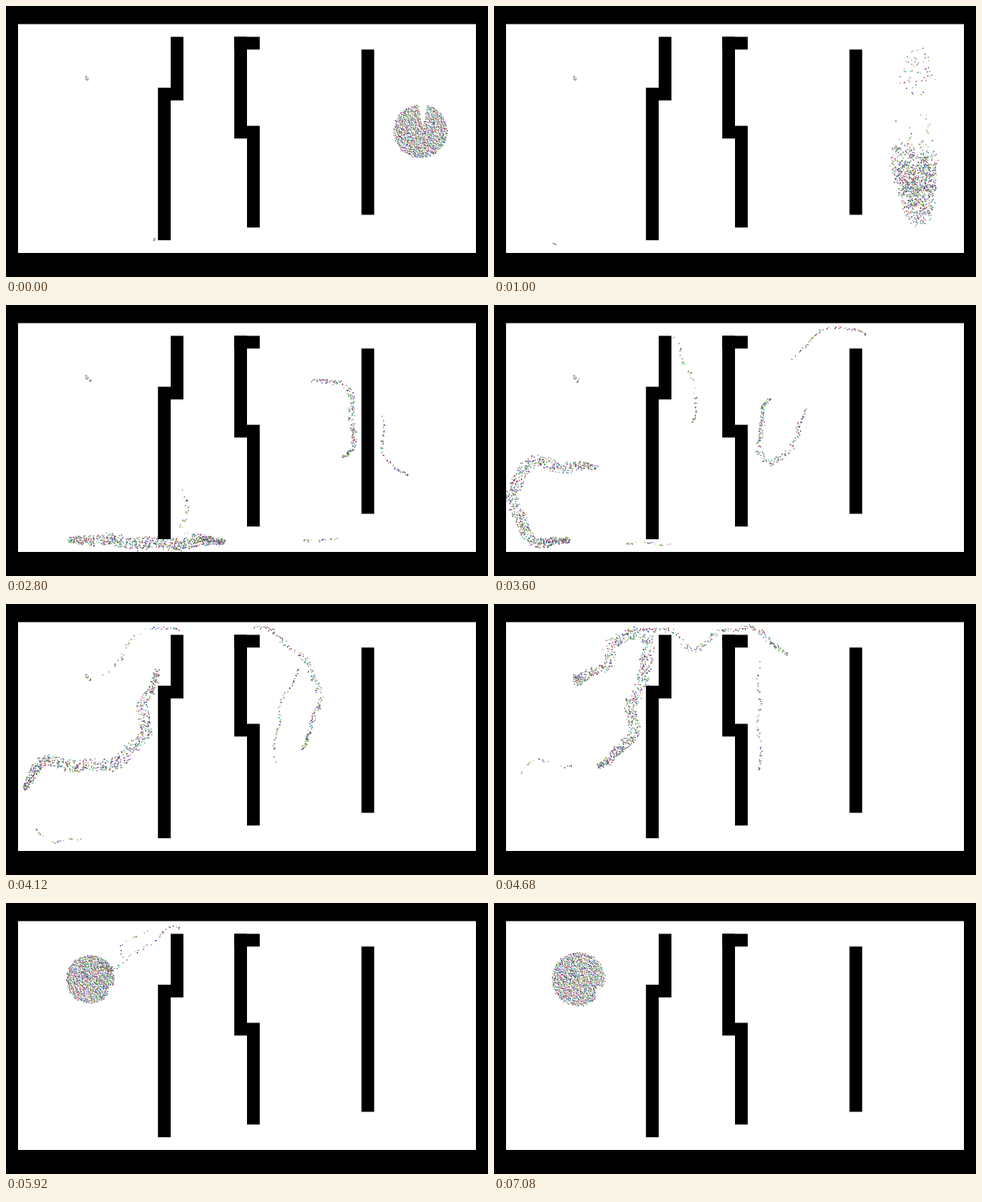
An HTML page with a canvas that plays this animation: 600x338 px, repeating every 7.12 s.

```html
<!DOCTYPE html>
<html lang="en">
<head>
<meta charset="utf-8">
<title>Crowd flow</title>
<style>
  html, body { margin: 0; width: 100%; height: 100%; overflow: hidden; background: #000; }
  canvas { display: block; }
</style>
</head>
<body>
<canvas id="stage" width="600" height="338"></canvas>
<script>
const ctx = document.getElementById('stage').getContext('2d');
const LOOP = 7120, STEP = 40, RADIUS = 33;
const SPEED = 0.25, SPEED_UP = 1780;   // px per ms, ms until cruising
const START = [516, 156], GOAL = [105, 95];
const FIELD = { x: 15, y: 22.6, cellW: 570 / 36, cellH: 285.4 / 18 };

let seed = 20;
function random() {
  seed = (seed * 1664525 + 1013904223) % 4294967296;
  return seed / 4294967296;
}
const clamp = v => Math.max(0, Math.min(1, v));
const mix = (a, b, f) => a + (b - a) * f;

// Smooth route through a few points, read by distance travelled.
function makeRoute(points) {
  const at = n => points[Math.max(0, Math.min(points.length - 1, n))];
  const samples = [];
  let length = 0;
  for (let k = 0; k <= (points.length - 1) * 20; k++) {
    const i = Math.floor(k / 20), f = k / 20 - i;
    const [a, b, c, d] = [at(i - 1), at(i), at(i + 1), at(i + 2)];
    const [x, y] = [0, 1].map(n => b[n] + 0.5 * f * (c[n] - a[n] +
      f * (2 * a[n] - 5 * b[n] + 4 * c[n] - d[n] + f * (3 * (b[n] - c[n]) + d[n] - a[n]))));
    const before = samples[samples.length - 1];
    if (before) length += Math.hypot(x - before.x, y - before.y);
    samples.push({ x, y, s: length });
  }
  const place = s => {
    s = Math.max(0, Math.min(length, s));
    let low = 0, high = samples.length - 1;
    while (high - low > 1) {
      const mid = (low + high) >> 1;
      if (samples[mid].s <= s) low = mid; else high = mid;
    }
    const a = samples[low], b = samples[high], gap = b.s - a.s || 1;
    const f = (s - a.s) / gap;
    return { x: mix(a.x, b.x, f), y: mix(a.y, b.y, f), nx: (a.y - b.y) / gap, ny: (b.x - a.x) / gap };
  };
  return { length, place };
}

const exit = [START, [528, 250], [508, 291], [440, 293]];
const finish = [[190, 50], [176, 34], [147, 52], [143, 72], GOAL];
const corner = [[102, 292], [60, 297], [35, 275], [24, 235]];

const west = makeRoute([...exit, [290, 292], [195, 298], ...corner, [45, 198], [96, 202],
  [135, 198], [171, 165], [172, 125], [188, 85], ...finish]);
const middle = makeRoute([...exit, [367, 227], [400, 196], [430, 180], [421, 99], [350, 110],
  [330, 168], [348, 198], [378, 160], [387, 97], [335, 38], [290, 31], [250, 55], [215, 32], ...finish.slice(1)]);
const upward = makeRoute([...exit, [290, 292], [225, 285], [224, 258], [218, 172], [253, 132],
  [235, 65], [213, 31], ...finish.slice(1)]);
const top3 = makeRoute([START, [528, 55], [487, 62], [475, 95], [480, 220], [555, 215], [475, 195],
  [465, 45], [400, 38], [345, 121], [333, 207], [330, 150], [325, 40], [280, 33], [245, 53],
  [213, 31], [183, 47], [153, 70], GOAL]);
const left = makeRoute([[189, 289], ...corner, [55, 169], GOAL]);

const groups = [
  { route: west, count: 760, delay: 0, length: 88, width: 0.26, loose: 1 },
  { route: middle, count: 200, delay: 100, length: 66, width: 0.12, loose: 1 },
  { route: upward, count: 50, delay: 150, length: 43, width: 0.07, loose: 1 },
  { route: top3, count: 55, delay: -60, length: 40, width: 0.05, loose: 1 },
  { route: west, count: 18, delay: 870, length: 25, width: 0.05, loose: 1 },
  { route: left, count: 3, delay: -280, length: 8, width: 0.04, loose: 0.15 }
];

// Steady acceleration, then constant speed.
function travelled(t) {
  if (t <= 0) return 0;
  return t < SPEED_UP ? SPEED * t * t / (2 * SPEED_UP) : SPEED * (t - SPEED_UP / 2);
}

// The queue stretches out as it travels.
function progress({ group, u }, t) {
  const s = travelled(t - group.delay);
  return s + (u - 0.5) * group.length * (1 + s / 400) * clamp(s / 100);
}

function arrival(dot) {
  let t = 0;
  while (t < LOOP && progress(dot, t) < dot.group.route.length) t += 10;
  return t;
}

// Evenly packed disc, leaving out the places where blocked() holds.
function packDisc(count, blocked) {
  const spots = [];
  for (let k = 0; spots.length < count; k++) {
    const r = RADIUS * Math.sqrt((k + 0.5) / (count * 1.03));
    const x = r * Math.cos(k * 2.39996) + random() - 0.5;
    const y = r * Math.sin(k * 2.39996) + random() - 0.5;
    if (!blocked(x, y)) spots.push([x, y]);
  }
  return spots;
}

const dots = groups.flatMap(group => Array.from({ length: group.count }, () => {
  const [r, g, b] = [0, 0, 0].map(() => Math.floor(20 + random() * 190));
  const dot = { group, u: random() ** 1.25, order: random(), phase: random() * 6.28, color: `rgb(${r},${g},${b})` };
  dot.arrival = arrival(dot);
  return dot;
}));

// Mixed places at the start; at the goal the disc fills from the centre.
function assign(name, sortBy, spots) {
  [...dots].sort((a, b) => a[sortBy] - b[sortBy]).forEach((dot, i) => { dot[name] = spots[i]; });
}
assign('start', 'order', packDisc(dots.length, (x, y) => y < -8 && Math.abs(x - 3) < 1 - (y + 8) * 0.2));
assign('goal', 'arrival', packDisc(dots.length, (x, y) => x > 22 && y > 9 && y < 24));

function position(dot, t) {
  const { route, width, loose } = dot.group;
  const s = progress(dot, t);
  const { x, y, nx, ny } = route.place(s);
  const gathered = Math.exp(-((Math.max(0, s) / 110) ** 2));
  const settled = clamp((s - route.length) / 25 + 1);
  const lens = 0.3 + 0.7 * Math.sqrt(4 * dot.u * (1 - dot.u));
  const spread = mix(width * lens, loose, gathered);
  const wave = 2 * Math.sin(s / 9) * (1 - gathered) * (1 - settled);
  const sway = 0.6 * Math.sin(t / 280 + dot.phase);
  return [
    x + nx * wave + mix(dot.start[0] * spread, dot.goal[0], settled) + sway,
    y + ny * wave + mix(dot.start[1] * spread, dot.goal[1], settled) - sway
  ];
}

// Column, row, columns wide, rows high.
const walls = [[12, 1, 1, 5], [11, 5, 1, 12], [17, 1, 1, 8], [17, 1, 2, 1], [18, 8, 1, 8], [27, 2, 1, 13]];

function drawWalls() {
  const { x, y, cellW, cellH } = FIELD;
  ctx.fillStyle = '#000';
  for (const [col, row, w, h] of walls)
    ctx.fillRect(x + col * cellW, y + row * cellH, w * cellW, h * cellH);
}

const pointer = new Path2D('M99.3 87v5.2l1.2-1 .9 1.8.8-.4-.7-1.6 1.5-.2z');
function drawPointer() {
  ctx.fillStyle = '#fff';
  ctx.fill(pointer);
  ctx.strokeStyle = '#666';
  ctx.lineWidth = 0.7;
  ctx.stroke(pointer);
}

function draw(t) {
  ctx.fillStyle = '#000';
  ctx.fillRect(0, 0, 600, 338);
  ctx.fillStyle = '#fff';
  ctx.fillRect(FIELD.x, FIELD.y, FIELD.cellW * 36, FIELD.cellH * 18);
  drawPointer();
  for (const dot of dots) {
    const [x, y] = position(dot, t);
    ctx.fillStyle = dot.color;
    ctx.fillRect(x - 0.65, y - 0.65, 1.3, 1.3);
  }
  drawWalls();
}

const began = performance.now();
function tick() {
  const t = (performance.now() - began) % LOOP;
  draw(Math.floor(t / STEP) * STEP);
  requestAnimationFrame(tick);
}
tick();
</script>
</body>
</html>
```
